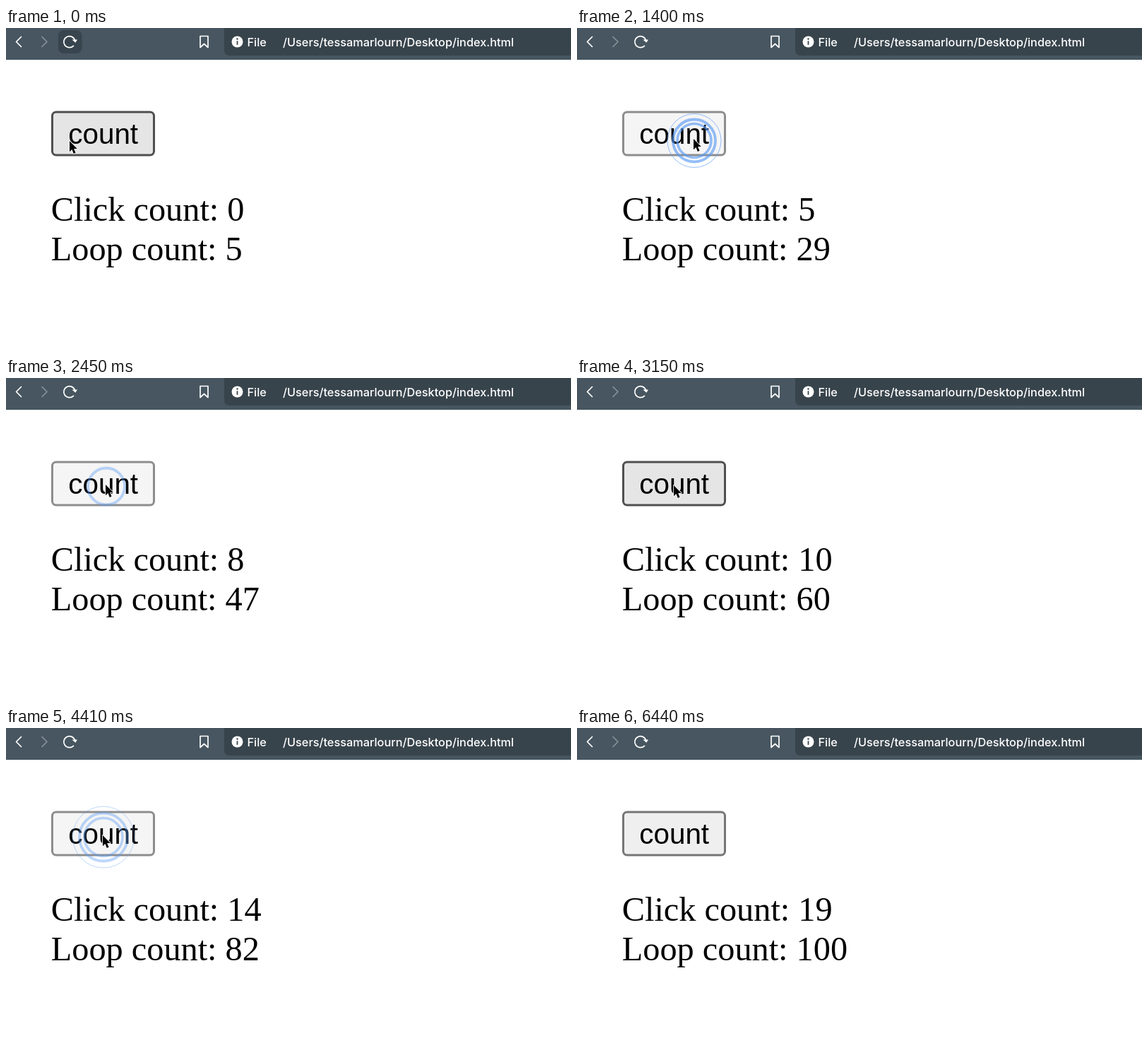
These frames come from a looping animation (800x456 px, 6720 ms). An HTML page:

```html
<!DOCTYPE html>
<html lang="en">
<head>
<meta charset="utf-8">
<title>Click and loop counters</title>
<style>
  html, body { margin: 0; width: 100%; height: 100%; overflow: hidden; background: #fff; }
  svg { display: block; width: 800px; height: 456px; }
  .line { fill: none; stroke: #fff; stroke-width: 1.7; stroke-linecap: round; stroke-linejoin: round; }
  .bar { font: 500 16.3px Inter, Roboto, sans-serif; fill: #fff; }
  .page { font: 48.3px "Liberation Serif", "Times New Roman", serif; }
  .label { font: 40.4px "Liberation Sans", Arial, sans-serif; text-anchor: middle; }
</style>
</head>
<body>
<svg viewBox="0 0 800 456">
  <rect width="800" height="45" fill="#475660"/>
  <path d="M309 0H800V39H317Q309 39 309 31Z" fill="#38444c"/>
  <rect id="reload" x="74" y="3" width="33.5" height="33" rx="8" fill="#38454e"/>
  <path class="line" d="M21.5 12.5L14.5 19.5L21.5 26.5"/>
  <path class="line" d="M51 12.5L58 19.5L51 26.5" style="stroke:#87939a"/>
  <path class="line" d="M97.5 17.500A8 8 0 1 0 95.500 25.300"/>
  <path d="M93.500 16.500H101L98.300 20.800Z" fill="#fff"/>
  <path class="line" d="M275 11.500H286V27.500L280.500 22.500L275 27.500Z"/>
  <circle cx="327.5" cy="19.5" r="8" fill="#fff"/>
  <path d="M327.500 18.300V23.800" stroke="#38444c" stroke-width="1.800"/>
  <circle cx="327.500" cy="15.500" r="1.200" fill="#38444c"/>
  <text class="bar" x="341.5" y="25.5">File</text>
  <text class="bar" x="392" y="25.5">/Users/tessamarlourn/Desktop/index.html</text>

  <rect id="button" x="65.5" y="119" width="144" height="61" rx="5.5" stroke-width="3"/>
  <text class="label" x="137.7" y="163.5">count</text>
  <text class="page" id="clicks" x="63.8" y="273"></text>
  <text class="page" id="loops" x="63.8" y="329"></text>

  <g id="pointer">
    <g id="rings" fill="none" stroke="#5b9bf5"></g>
    <path d="M0 0V16.500L3.700 13L6.300 19.500L9.300 18.200L6.700 12H11.800Z" transform="scale(.92)"
          stroke="#fff" stroke-width="1.800" paint-order="stroke" stroke-linejoin="round"/>
  </g>
</svg>
<script>
const LOOP = 6720, STEP = 70, END = 6440, CLICKS = 19, HELD = 3;
const $ = id => document.getElementById(id);

const looks = {
  idle: ["#efefef", "#767676"],
  hover: ["#e5e5e5", "#4f4f4f"],
  active: ["#f5f5f5", "#8d8d8d"]
};

// A steady clicking rhythm with a slight sway, in steps
const pressStep = n => Math.round(4.45 * n - 2 + 1.05 * Math.cos((n - 8) * Math.PI / 3));

function ease(t, from, to) {
  const u = Math.max(0, Math.min(1, (t - from) / (to - from)));
  return u * u * (3 - 2 * u);
}

function pointerAt(t) {
  const a = ease(t, 0, 280), b = ease(t, 1540, 2100), c = ease(t, 2450, 2660);
  return [90 + 75 * a - 24 * b - 4 * c, 160 - 3 * a - 6 * b + c];
}

const ring = (r, width, opacity) =>
  `<circle cx="1" cy="2.5" r="${r}" stroke-width="${width}" opacity="${opacity}"/>`;

// One ring on press, then two more spread out around it and fade
function ripple(age) {
  const opacity = .65 - .25 * Math.abs(age - 1);
  const main = ring(26 + 4 * age, 3.8, opacity);
  return age ? main + ring(21 + 3 * age, 3.6, opacity) + ring(32.5 + 5.5 * age, 1, opacity) : main;
}

function draw(now) {
  const t = Math.min(END, Math.floor(now % LOOP / STEP) * STEP);
  const step = t / STEP;
  let count = 0;
  while (count < CLICKS && pressStep(count + 1) <= step) count++;
  const age = step - pressStep(count);
  const held = count > 0 && age < HELD;
  const gone = t >= END;
  const [fill, stroke] = looks[gone ? "idle" : held ? "active" : "hover"];

  $("button").setAttribute("fill", fill);
  $("button").setAttribute("stroke", stroke);
  $("reload").style.display = step ? "none" : "";
  $("clicks").textContent = "Click count: " + count;
  $("loops").textContent = "Loop count: " + Math.min(100, Math.floor(5.2 + t * .01743));
  $("pointer").style.display = gone ? "none" : "";
  $("pointer").setAttribute("transform", `translate(${pointerAt(t)})`);
  $("rings").innerHTML = held ? ripple(age) : "";
}

const start = performance.now();
function tick() {
  draw(performance.now() - start);
  requestAnimationFrame(tick);
}
tick();
</script>
</body>
</html>
```
